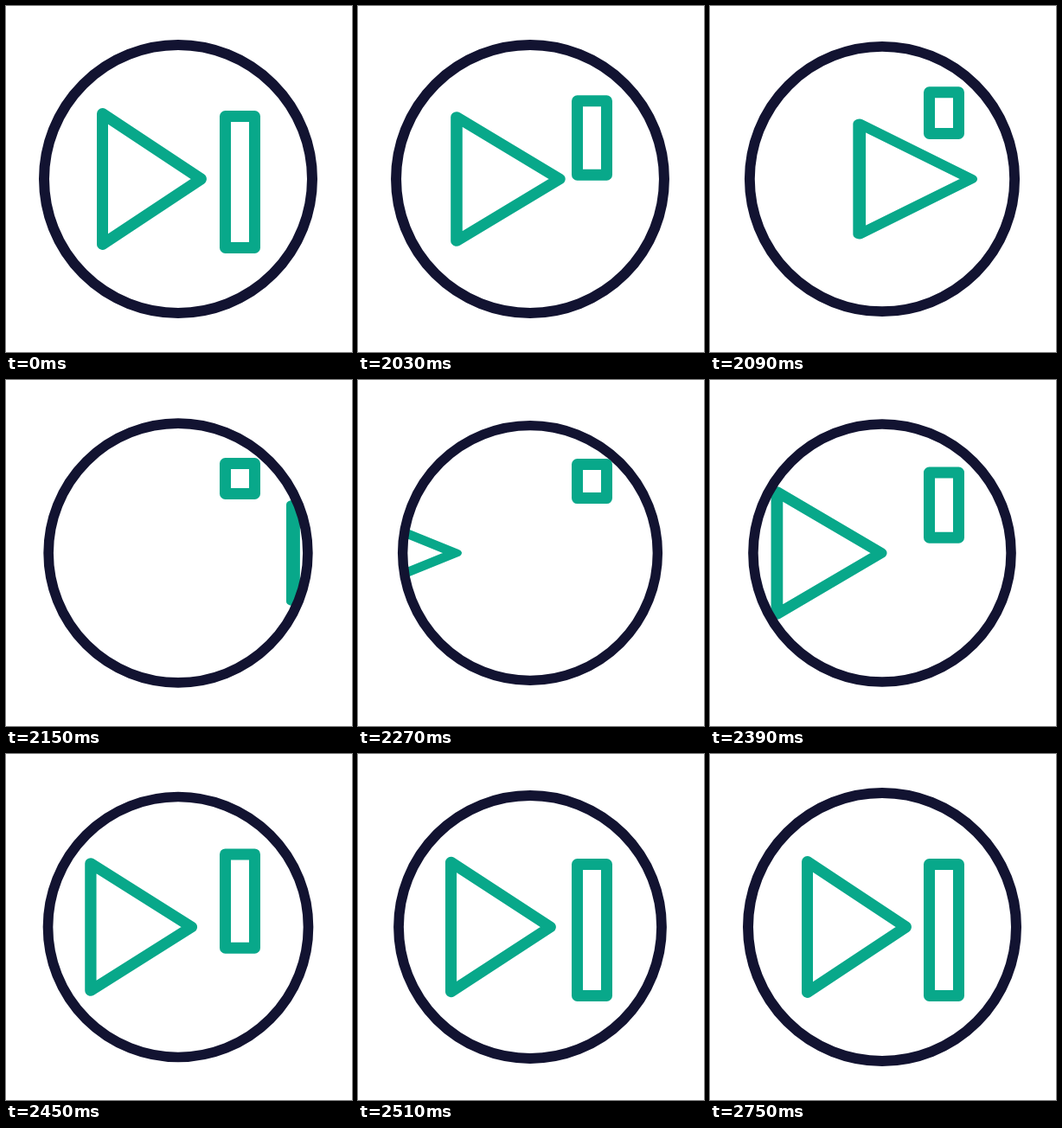
These frames come from a looping animation (400x400 px, 2.78 s). An HTML page:

```html
<!DOCTYPE html>
<html lang="en">
<head>
<meta charset="utf-8">
<title>Next track</title>
<style>
html, body { margin: 0; height: 100%; overflow: hidden; background: #fff; }
svg { display: block; width: 100vw; height: 100vh; fill: none; stroke-linejoin: round; }
</style>
</head>
<body>
<svg viewBox="0 0 400 400">
  <clipPath id="disc"><circle cx="199" cy="200" r="148"/></clipPath>
  <g clip-path="url(#disc)">
    <path id="arrow" d="M-57-75.5L57 0L-57 75.5Z" stroke="#08a88a" stroke-width="13"/>
  </g>
  <circle id="ring" r="155" stroke="#121331" stroke-width="12"/>
  <rect id="bar" x="253.5" width="34" stroke="#08a88a" stroke-width="13"/>
</svg>
<script>
const LOOP = 2780, START = 2030, STEP = 30;
const [arrow, ring, bar] = ['arrow', 'ring', 'bar'].map(id => document.getElementById(id));
const span = (t, a, b) => Math.min(1, Math.max(0, (t - a) / (b - a)));
const sine = p => (1 - Math.cos(Math.PI * p)) / 2;

// Arrow centre and its stretch, 0 to 1
function arrowAt(t) {
  if (t < START) return [168.5, 0];
  if (t < 2200) return [168.5 + 233 * ((t - 2000) / 150) ** 2.39, span(t, 2000, 2150)];
  const left = ((2750 - t) / 480) ** 4.8;
  return [169.5 - 127 * left, Math.min(1, left)];
}

// How far the bar has shrunk towards a square
function shrinkAt(t) {
  if (t < START) return 0;
  return t < 2180 ? 1 - (1 - span(t, 1967, 2150)) ** 2 : 1 - span(t, 2210, 2510) ** 2.1;
}

function pressAt(t) {
  if (t < START) return 0;
  return t < 2235 ? sine(span(t, 2020, 2235)) : 1 - sine(span(t, 2235, 2715));
}

function draw(now) {
  let t = now % LOOP;
  t = t < START ? 0 : START + STEP * Math.floor((t - START) / STEP);

  const [x, stretch] = arrowAt(t);
  arrow.setAttribute('transform',
    `translate(${x} 200) scale(${1 + 0.22 * stretch} ${1 - 0.255 * stretch})`);

  const shrink = shrinkAt(t);
  bar.setAttribute('y', 127.5 - 31 * shrink);
  bar.setAttribute('height', 152 - 117 * shrink);

  ring.setAttribute('transform', `translate(199 200) scale(${1 - 0.05 * pressAt(t)})`);
}

const origin = performance.now();
function frame() {
  draw(performance.now() - origin);
  requestAnimationFrame(frame);
}
frame();
</script>
</body>
</html>
```
